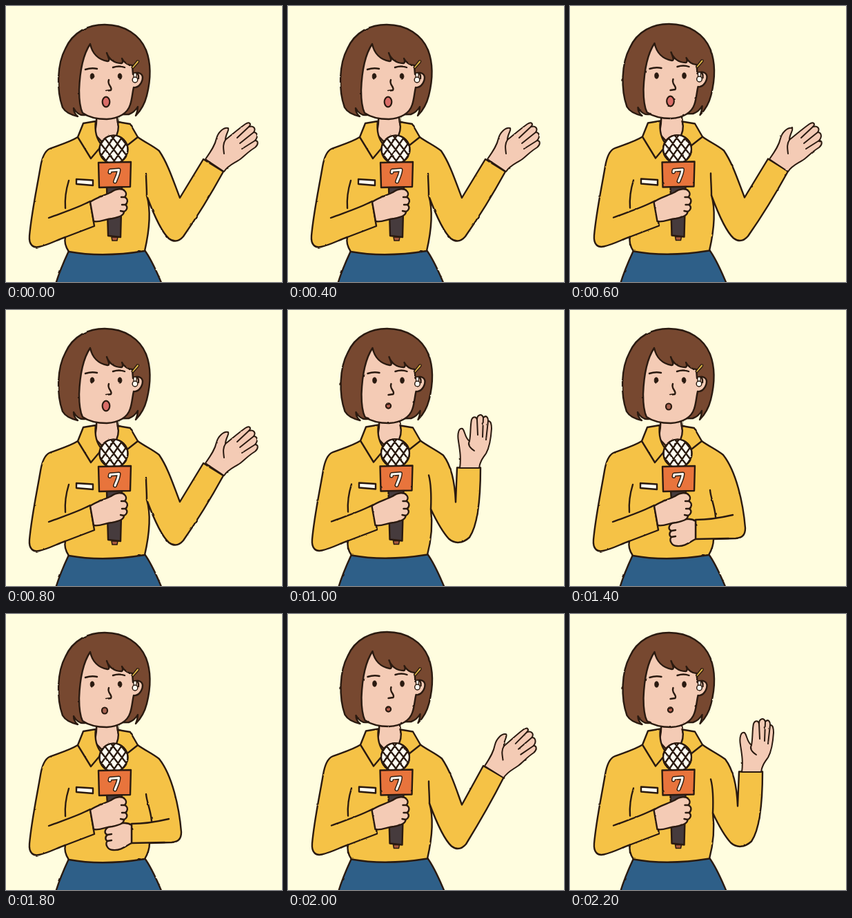
These frames come from a looping animation (400 by 400 pixels, 2.4 s). An HTML page:

```html
<!DOCTYPE html>
<html lang="en">
<head>
<meta charset="utf-8">
<title>Reporter</title>
<style>
html, body { margin: 0; height: 100%; overflow: hidden; background: #fffddf; }
svg { display: block; width: 100%; height: 100%; }
</style>
</head>
<body>
<svg id="stage" viewBox="0 0 400 400"></svg>
<script>
const INK = '#2a1a10', SKIN = '#f4cbb5', SHIRT = '#f5c246', HAIR = '#774830',
      CREAM = '#fffdf2', DARK = '#463b3d';
const STEP = 200, POSES = 'AAAAABDCCCDB';

const shape = (d, fill = 'none', w = 2.4) =>
  `<path d="${d}" fill="${fill}" stroke="${INK}" stroke-width="${w}"/>`;
const oval = (x, y, rx, ry, fill, w = 2.2) =>
  `<ellipse cx="${x}" cy="${y}" rx="${rx}" ry="${ry}" fill="${fill}" stroke="${INK}" stroke-width="${w}"/>`;
const group = (content, transform) => `<g transform="${transform}">${content}</g>`;

const outHand =
  shape('M289 222C299 208 303 201 305 192C307 184 315 175 322 177C324 180 318 186 318 194C328 186 337 178 347 171C353 167 356 171 352 175C358 173 363 177 359 183C364 183 366 189 361 195C366 195 366 201 361 205C351 211 345 218 338 223C329 229 322 231 316 240Z', SKIN, 2) +
  shape('M352 175L335 191M359 183L339 199M361 195L342 207M318 194C314 200 315 206 316 214', 'none', 2);
const outCrease = shape('M203 243C203 254 204 262 204 275');

// Each arm continues the shirt outline from the right waist up to the collar.
const arms = {
  A: {
    edge: 'C209 320 210 295 204 275C214 302 226 328 236 337C244 343 251 341 257 334C278 304 298 271 315 240L286 222L252 278C243 255 235 229 222 210C212 202 202 198 191 190',
    hand: outHand, extra: outCrease
  },
  D: {
    edge: 'C209 320 210 295 204 275C214 302 226 328 236 337C244 343 251 341 257 334C276 303 295 270 311.500 237.500L282 220.500L251 277C243 255 235 229 222 210C212 202 202 198 191 190',
    hand: group(outHand, 'rotate(-2 243 340)'), extra: outCrease
  },
  B: {
    edge: 'C209 325 208 305 206 289C214 306 222 321 232 332C241 340 252 339 262 330C275 311 278 270 278 229L244 229L242 279C241 253 237 228 224 211C213 203 202 198 191 190',
    hand: shape('M249 229C251 213 249 203 247 190C245 178 248 170 253 172C257 176 256 185 263 190C265 180 264 168 266 159C268 154 273 154 274 159C274 151 281 150 283 156C287 152 290 155 290 161C294 160 295 166 295 172C294 188 292 199 287 208C282 215 278 220 277 229Z', SKIN, 2) +
      shape('M274 159L275 181M283 156L282 184M290 161L287 188M263 190C260 195 264 200 270 204', 'none', 2),
    extra: shape('M203 240C206 251 207 265 206 289')
  },
  C: {
    edge: 'C207 345 208 338 208 332L240 331C250 330 254 326 254 316C251 280 241 234 222 210C212 202 202 198 191 190',
    hand: shape('M182 332L182 304C201 304 219 301 236 297L245 320L230 331Z', SHIRT, 0) +
      shape('M236 297C219 301 201 304 182 304L182 332L230 331') +
      shape('M182 306C174 300 164 304 150 308C142 312 142 318 147 320C143 323 144 328 147 329C143 333 147 342 155 342C167 343 174 336 182 332Z', SKIN) +
      shape('M147 320L153 319M147 329L153 328'),
    extra: shape('M203 261C204 273 210 285 211 300')
  }
};

function body(arm) {
  return shape('M91 355C84 370 77 386 72 403L226 403C219 387 212 369 201 354Z', '#2e5f88') +
    shape('M104 190C91 198 75 202 63 207C55 211 52 221 50 233C44 268 37 300 34 333C33 346 39 351 48 349C62 346 74 339 86 335C84 343 87 350 91 356C124 362 164 361 201 355' + arm.edge + 'Z', SHIRT) +
    shape('M86 335L128 319L122 283C103 293 83 299 62 307M91 253C87 266 85 280 86 293') + arm.extra +
    shape('M131 158C132 172 130 178 128 185L156 215L178 190C163 180 161 172 161 158Z', SKIN) +
    shape('M130 167L112 170L104 190L123 221L139 202C132 194 128 183 130 167ZM162 168L180 171L191 190L172 205C168 201 162 196 157 193C162 186 164 177 162 168Z', SHIRT) +
    shape('M102 251L126 252.500L126 260L102 258Z', CREAM);
}

function head(mouth) {
  return shape('M113 158C107 159 101 154 98 148C98 153 100 157 104 160C95 158 86 154 82 147C73 122 74 84 86 62C97 37 120 27 143 27C172 27 194 42 203 64C211 85 209 110 204 130C201 142 196 151 188 159C190 154 191 150 191 146C188 151 184 155 178 157Z', HAIR) +
    shape('M122 55C112 70 107 94 106 122C106 136 107 147 111 155C121 162 133 164 146 164C163 163 176 156 180 143C183 134 183 126 185 118C192 119 198 111 198 103C197 96 188 95 184 99L183 86C177 86 171 82 168 76C170 80 169 83 167 83C157 83 149 77 146 68C149 76 151 80 147 80C134 78 125 69 122 55Z', SKIN) +
    shape('M115 92Q124 89 132 91M155 89Q164 86 172 89M149 107C146 115 155 117 152 122L145 123') +
    oval(125, 102, 2.8, 4.2, INK, 0.8) + oval(165, 102, 2.8, 4.2, INK, 0.8) + mouth +
    shape('M187 97Q193 97 192 105') +
    shape('M185 97L189 97L189 104L185 104Z', CREAM, 1.3) + oval(187, 107, 3.8, 4, CREAM, 1.5) +
    shape('M182 89L190 79Q194 78 192 82L184 91Z', '#dfb747', 1.3);
}

function mic(pose) {
  let grid = '';
  for (let i = -2; i <= 2; i++) {
    const x = 156 + i * 12;
    grid += `M${x - 17} 233L${x + 17} 183M${x - 18} 185L${x + 18} 231`;
  }
  const seven = (color, w) =>
    `<path d="M150.500 241L151 238.500L163.500 237.500C163 244 160 249 158 254.500" fill="none" stroke="${color}" stroke-width="${w}"/>`;
  const handle = pose === 'C'
    ? shape('M146 262L168 262L167 275L147 275Z', DARK)
    : shape('M153 335L154 340L161 340L162 335Z', '#a95a3d', 1.5) +
      shape('M146 262L168 262L166 335L148 333Z', DARK);
  return handle + oval(156, 208, 20.5, 20.5, CREAM) +
    `<g clip-path="url(#ball)">${shape(grid)}</g>` + oval(156, 208, 20.5, 20.5, 'none') +
    shape('M134 227L181 226L180 262L135 263Z', '#e8743c') + seven(INK, 6) + seven(CREAM, 3.2);
}

const gripHand =
  shape('M122 284C130 278 142 275 152 270C160 264 169 264 172 268C176 272 173 276 172 277C178 280 176 286 173 288C178 292 174 297 171 298C171 304 163 306 154 308C143 309 136 314 127 312Z', SKIN) +
  shape('M172 277L167 277M173 288L168 288M171 298L166 297');

function draw(step) {
  const pose = POSES[step], alt = 'BD'.includes(pose) || step === 1 || step === 3 || step === 8;
  const arm = arms[pose], lift = alt && pose !== 'B' && pose !== 'C' ? -1 : 0;
  const mouth = pose === 'A' ? oval(145, 139, 5.3, 7.3, '#d96d68')
    : alt ? oval(145, 139, 3.6, 3.6, '#b96050') : oval(143, 140, 4, 4.5, '#a76351');
  const move = (x, y) => alt ? `translate(${x} ${y})` : '';
  return `<defs>
    <clipPath id="ball"><circle cx="156" cy="208" r="20.5"/></clipPath>
    <filter id="rough" filterUnits="userSpaceOnUse" x="-10" y="-10" width="420" height="420" color-interpolation-filters="sRGB">
      <feTurbulence type="fractalNoise" baseFrequency=".1" numOctaves="2" seed="${alt ? 8 : 3}"/>
      <feDisplacementMap in="SourceGraphic" scale="1.8" xChannelSelector="R" yChannelSelector="G"/>
    </filter></defs>
    <g filter="url(#rough)" stroke-linecap="round" stroke-linejoin="round">` +
    group(body(arm), move(1, -0.5)) +
    group(head(mouth), move(0.5, lift)) +
    (pose === 'C' ? mic(pose) + group(arm.hand, move(1, 0)) : group(arm.hand, '') + group(mic(pose), move(-0.5, -0.5))) +
    group(gripHand, move(-0.5, 0)) + '</g>';
}

const stage = document.getElementById('stage');
const start = performance.now();
let shown = -1;
function tick() {
  const step = Math.floor((performance.now() - start) / STEP) % POSES.length;
  if (step !== shown) stage.innerHTML = draw(shown = step);
  requestAnimationFrame(tick);
}
tick();
</script>
</body>
</html>
```
